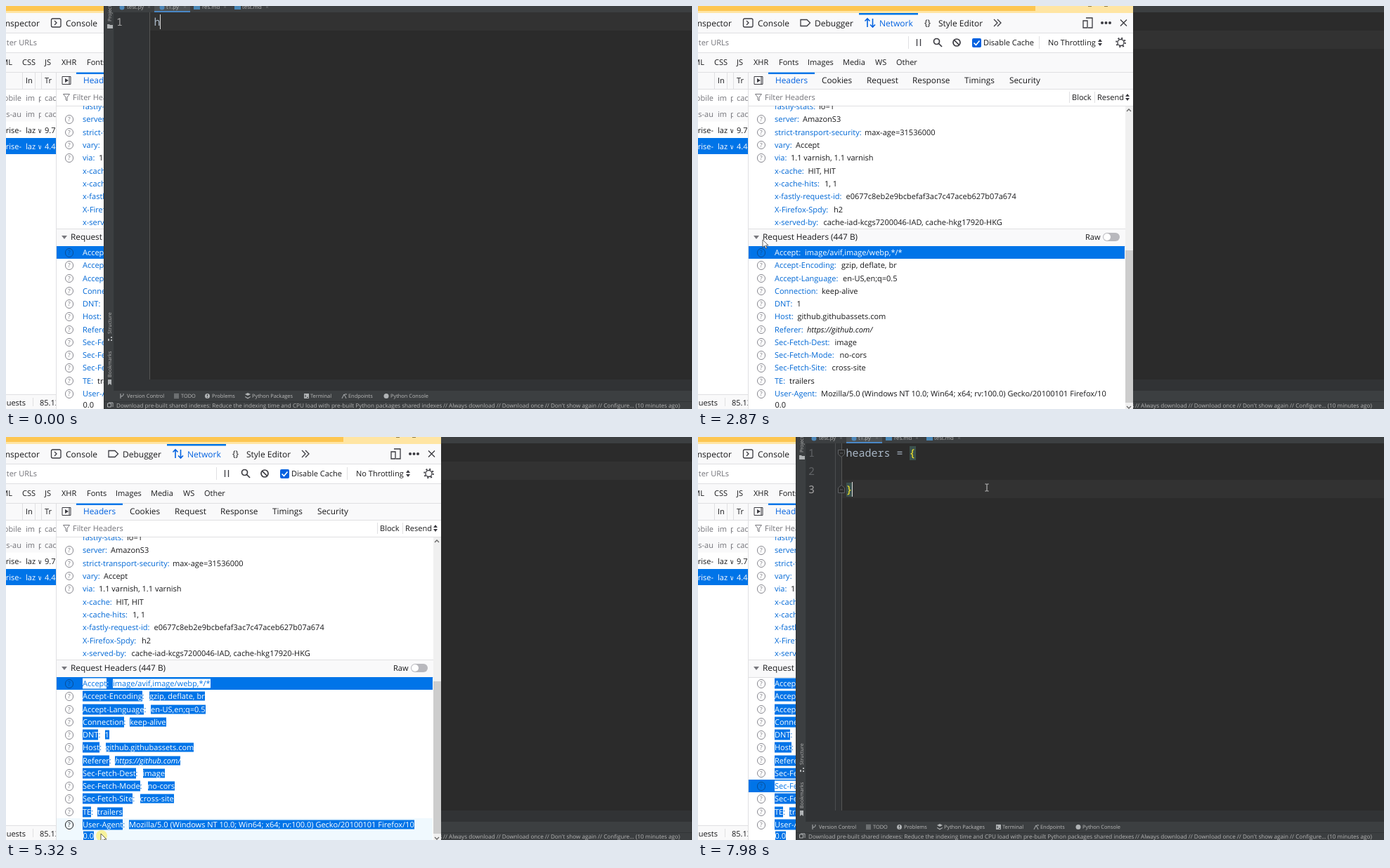
An HTML page that plays this animation: 976 by 574 pixels, repeating every 8000 ms.

```html
<!DOCTYPE html>
<html lang="en">
<head>
<meta charset="utf-8">
<title>Copying request headers</title>
<style>
html, body { margin: 0; width: 100%; height: 100%; overflow: hidden; background: #2b2b2b; }
#stage { position: absolute; left: 0; top: 0; width: 976px; height: 574px; overflow: hidden;
  font: 11px/13px "Open Sans", "Noto Sans", sans-serif; text-rendering: geometricPrecision; }
#stage div, #stage svg, #stage span { position: absolute; }
#stage svg { left: 0; top: 0; overflow: visible; }
#stage .t { white-space: pre; transform: translateY(-50%); }
#stage .t.end { transform: translate(-100%, -50%); }
#stage span.in { position: static; }

#browser { z-index: 1; left: 0; top: 0; width: 619px; height: 574px; background: #fff; color: #18181a; overflow: hidden; }
#browser.front { z-index: 3; }
.bar { font-size: 12px; }
.sub { font-size: 11.8px; }
.dim { color: #737379; }
.blue { color: #0061e0; }
.white { color: #fff; }
#list { inset: 0; clip-path: inset(142px 11px 0 72px); }
.row { left: 72px; width: 535px; }
.row .t { top: 9px; }
.row .label { left: 37px; color: #0068d6; }
.row .help { left: 11.5px; top: 3px; width: 10.6px; height: 10.6px; border: 1px solid #87878f; border-radius: 50%;
  color: #77777f; font-size: 8.5px; line-height: 11px; text-align: center; }
.row .cite { font-style: italic; }
.row.hover { background: #f0f9fe; }
.row.on { background: #0074e8; color: #fff; }
.row.on .label { color: #fff; }
.row.on .help { border-color: #0a4d96; color: #0a4d96; }
.row.hover .help, .row.on.hover .help { border-color: #18181a; color: #18181a; }
.row.on.hover { background: #0074e8; }
.row .sel { background: #0074e8; color: #fff; }
.row.on .sel { background: #fff; color: #0074e8; }
#menu { left: 162px; top: 491px; width: 54px; height: 43px; background: #fff; border: 1px solid #bbb;
  box-shadow: 2px 2px 3px #0006; font-size: 8.3px; color: #111; }
#menu .pick { left: 1px; top: 22px; width: 52px; height: 19px; background: #e3e3e3; }

#ide { z-index: 2; inset: 0; }
.tool { font-size: 7.4px; color: #bbb; }
.note { font-size: 8.15px; color: #b4b4b4; }
.tab { font-size: 7.8px; color: #b4b4b4; }
#ide .side { font-size: 7.1px; line-height: 10px; color: #b4b4b4; white-space: pre; transform-origin: 0 0; transform: rotate(-90deg); }
.code { font: 15px/26px "Noto Sans Mono", "DejaVu Sans Mono", monospace; color: #a9b7c6; white-space: pre; }
.num { color: #606366; left: 157px; }
.num.now { color: #a4a3a3; }
.brace { color: #e8ba36; }
.brace.match { color: #ffef28; background: #3b514d; }
#band { left: 205px; width: 771px; height: 26px; background: #323232; }
#caret { width: 1px; height: 21px; background: #ddd; }
#popup { left: 192px; top: 35px; width: 329px; background: #46484a; border: 1px solid #55585a; }
#popup .first { left: 0; top: 0; width: 329px; height: 21px; background: #515658; }
#popup .code { left: 17px; line-height: 21px; color: #bbb; }
#popup .in { color: #589df6; }
#popup .dot { left: 6px; width: 8px; height: 8px; border-radius: 50%; background: #4d86b8; }
#popup .tip { font-size: 6.2px; color: #85888a; left: 6px; bottom: 2px; white-space: pre; }
#popup .next { left: 122px; color: #589df6; }
#popup .more { left: 322px; bottom: 4px; width: 2px; height: 2px; background: #bbb; box-shadow: 0 -3px #bbb, 0 -6px #bbb; }
#mouse { z-index: 9; }
</style>
</head>
<body>
<div id="stage">
  <div id="browser">
    <svg width="619" height="574" fill="none" stroke="#3a3a40" stroke-width="1.3">
      <g stroke="none">
        <path fill="#ffe5a3" d="M0 0h619v10H0z"/>
        <path fill="#fdc651" d="M0 0h480v7H0z"/>
        <path fill="#f9f9fa" d="M0 10h619v28H0zM0 66h619v52H0zM0 141.5h71v23H0zM72 317h536v25H72zM0 553h71v21H0z"/>
        <path fill="#0074e8" d="M0 188h71v23H0zM229 10h84v2.5h-84zM100 94.5h66v2.5h-66z"/>
        <path fill="#f0f0f0" d="M608 142h11v432h-11z"/>
        <path fill="#cdcdcd" d="M608 348h11v217h-11z"/>
        <rect x="390" y="46" width="13" height="13" rx="2" fill="#0061e0"/>
        <rect x="576" y="323" width="24" height="12" rx="6" fill="#b8b8bd"/>
        <circle cx="582" cy="329" r="5" fill="#fff"/>
        <path fill="#77777d" d="M79 327h8l-4 5z"/>
        <g fill="#3a3a40"><circle cx="575" cy="24" r="2"/><circle cx="580.5" cy="24" r="2"/><circle cx="586" cy="24" r="2"/>
          <path d="M569 51l3-4 3 4zM569 53l3 4 3-4zM608 129l3-4 3 4zM608 131l3 4 3-4zM84 103l5 3-5 3z"/></g>
      </g>
      <path stroke="#e0e0e2" stroke-width="1" d="M0 38.5h619M0 66.5h619M0 94.5h100M166 94.5h453M0 118.5h619M72 142.5h547M72 317.5h536M72 342.5h536M0 553.5h71M71.5 94v480M23.5 95v23M41.5 95v23M50.5 95v23M38.5 558v12M299.5 43v18M485.5 43v18M528.5 122v16M564.5 122v16"/>
      <rect x="64.5" y="18" width="13.5" height="12" rx="2"/><path d="M69 21l3 3-3 3"/>
      <path d="M146 19.500h9l4.500 4.500-4.500 4.500h-9zM421 19l5 5-5 5M426 19l5 5-5 5M601 19.500l9 9M610 19.500l-9 9M311.500 47v10M316.500 47v10"/>
      <path stroke="#0061e0" stroke-width="1.600" d="M241 30V18M237.500 21.500l3.500-3.500 3.500 3.500M248.500 18v12M245 26.500l3.500 3.500 3.500-3.500"/>
      <path d="M552 17h9v14h-6M548 21h6v10h-6z"/>
      <g stroke-width="1.700"><circle cx="339.500" cy="50.500" r="4"/><path d="M342.500 53.500l4.500 4.500"/><circle cx="368" cy="52" r="5"/><path d="M364.500 48.500l7 7"/></g>
      <circle cx="601.500" cy="52" r="4.500"/><circle cx="601.500" cy="52" r="6.300" stroke-width="2" stroke-dasharray="2 2.950"/>
      <path stroke="#fff" stroke-width="1.600" d="M392.500 52.500l3 3 5-6"/>
      <path stroke-width="1" d="M80 100.500h12v11H80zM90 100.500v11"/>
      <path stroke="#77777d" stroke-width="1" d="M81.500 125.500h9l-3.500 4.500v5l-2-1.500v-3.500z"/>
      <path stroke="#666" d="M610 150l3-3 3 3M610 570l3 3 3-3"/>
      <path stroke="#77591c" d="M555 0h5M578 0h5"/>
    </svg>
    <div id="list"></div>
    <div id="menu"><div class="pick"></div>
      <div class="t" style="left:6px;top:13px"><u>C</u>opy</div><div class="t" style="left:6px;top:31px">Copy <u>A</u>ll</div></div>
  </div>

  <div id="ide">
    <svg width="976" height="574" fill="none" stroke="#b0b3b5">
      <g stroke="none">
        <path fill="#3c3f41" d="M139 0h837v574H139z"/>
        <path fill="#2b2b2b" d="M205 9h771v523H205z"/>
        <path fill="#313335" d="M153 9h51v539h-51zM204 532h772v16H204z"/>
        <path fill="#4e5254" d="M211 0h51v7h-51z"/><path fill="#4a88c7" d="M211 7h51v2h-51z"/>
        <circle cx="165" cy="2" r="3.5" fill="#4d86b8"/><circle cx="222" cy="2" r="3.5" fill="#4d86b8"/>
        <path fill="#4a88b7" d="M267 0h9v5h-9zM325 0h9v5h-9z"/>
        <path fill="#b0b3b5" d="M144 26h3l1 1h4v5h-8zM145 474h2v3h-2zM149 471h2v2h-2zM149 475h2v2h-2zM145 532h5v8l-2.500-2-2.500 2zM424 552h7v7h-7zM340 553l4-2 4 2-4 2zM340 556l4 2 4-2v1l-4 2.500-4-2.500z"/>
        <circle cx="286.500" cy="555.500" r="3.500" fill="#b0b3b5"/><circle cx="541" cy="555.500" r="3.500" fill="#b0b3b5"/>
      </g>
      <path stroke="#323537" d="M153.500 9v539M139 563.500h837M139.500 0v574"/>
      <path stroke="#555" d="M204.500 9v523"/>
      <path id="guide" stroke="#4b4d4f" d="M195.500 9v523"/>
      <path d="M163 552v7M167 552v2q0 2-4 2M239 553h7M239 555.500h7M239 558h7M478 559l3-6 3 6M482 553h3M144.500 566h5v5h-5zM146 565h6v6"/>
      <path stroke="#3c3f41" d="M286.500 553v3M286.500 557v1M425 554l2 1.500-2 1.500M428 557.500h2"/>
      <path stroke="#707375" stroke-width=".8" d="M202 0l3 3M205 0l-3 3M253 0l3 3M256 0l-3 3M310 0l3 3M313 0l-3 3M370 0l3 3M373 0l-3 3"/>
    </svg>
    <div id="band"></div>
    <svg id="folds" width="300" height="100" fill="#2b2b2b" stroke="#606366">
      <path d="M199.500 18.500h9v6l-4.500 4-4.500-4zM199.500 79.500h9v-7l-4.500-4-4.500 4zM202 23h4M202 75h4"/>
      <path fill="none" stroke="#a9923f" d="M211 83l2-2 2 2 2-2 2 2"/>
    </svg>
    <div id="lines"></div>
    <div id="caret"></div>
    <div id="popup"></div>
  </div>

  <svg id="mouse" width="20" height="20">
    <circle id="press" cx="1" cy="3" r="8" fill="#ffef4a" opacity=".55"/>
    <path id="arrow" d="M0 0v11l2.600-2.400 1.800 4 1.800-.8-1.800-3.800h3.600z" fill="#fff" stroke="#222" stroke-width=".7"/>
    <path id="beam" d="M-2.500-5h2l.5.500.5-.500h2M0-4.500v9M-2.500 5h2l.5-.500.5.500h2" fill="none" stroke="#ccc"/>
  </svg>
</div>
<script>
const $ = id => document.getElementById(id);
const browser = $('browser'), ide = $('ide'), list = $('list'), popup = $('popup');

function make(parent, cls, style = {}, html = '') {
  const el = document.createElement('div');
  el.className = cls;
  el.innerHTML = html;
  for (const key in style) el.style[key] = typeof style[key] === 'number' ? style[key] + 'px' : style[key];
  parent.append(el);
  return el;
}
// Each item: x, vertical centre, text, optional clip width.
function texts(parent, cls, items) {
  for (const [left, top, text, width] of items)
    make(parent, 't ' + cls, width ? { left, top, width, overflow: 'hidden' } : { left, top }, text);
}

texts(browser, 'bar end', [[48, 24, 'Inspector']]);
texts(browser, 'bar', [[85, 24, 'Console'], [166, 24, 'Debugger'], [322, 23, '{}'], [342, 24, 'Style Editor']]);
texts(browser, 'bar blue', [[258, 24, 'Network']]);
texts(browser, 'dim end', [[44, 52, 'Filter URLs']]);
texts(browser, 'end', [[9, 80, 'HTML'], [28, 565, 'requests']]);
texts(browser, '', [[406, 52, 'Disable Cache'], [498, 52, 'No Throttling'], [23, 80, 'CSS'], [55, 80, 'JS'], [79, 80, 'XHR'],
  [115, 80, 'Fonts'], [156, 80, 'Images'], [206, 80, 'Media'], [252, 80, 'WS'], [282, 80, 'Other'],
  [28, 106, 'In'], [55, 106, 'Tr'], [532, 130, 'Block'], [568, 130, 'Resend'], [48, 565, '85.13', 23]]);
texts(browser, 'sub blue', [[110, 106, 'Headers']]);
texts(browser, 'sub', [[176, 106, 'Cookies'], [240, 106, 'Request'], [305, 106, 'Response'], [379, 106, 'Timings'],
  [443, 106, 'Security'], [92, 329, 'Request Headers (447 B)']]);
texts(browser, '', [[551, 329, 'Raw']]);
texts(browser, 'dim', [[95, 130, 'Filter Headers']]);
[['mobile', 'im', 'p', 'cac'], ['ns-au', 'im', 'p', 'cac'], ['prise-', 'laz', 'w', '9.7'], ['prise-', 'laz', 'w', '4.4']]
  .forEach(([file, by, type, size], i) => {
    const y = 130.5 + 23 * i, cls = ['dim', 'dim', '', 'white'][i];
    texts(browser, cls + ' end', [[22, y, file]]);
    texts(browser, cls, [[28, y, by, 14], [46, y, type, 4], [55, y, size, 16]]);
  });

function headerRow(y, name, x, value, help, height = 18.3) {
  const row = make(list, 'row', { top: y - 9, height });
  if (help) make(row, 'help', {}, '?');
  make(row, 't label', {}, `<span class="in">${name}</span>:`);
  const cells = [row.querySelector('.in'), make(row, 't', { left: x - 72 }, value)];
  return { row, cells };
}
[['fastly-stats', 172, 'io=1'], ['server', 149, 'AmazonS3'], ['strict-transport-security', 237, 'max-age=31536000'],
  ['vary', 139, 'Accept'], ['via', 132, '1.1 varnish, 1.1 varnish'], ['x-cache', 156.5, 'HIT, HIT'], ['x-cache-hits', 180, '1, 1'],
  ['x-fastly-request-id', 210.5, 'e0677c8eb2e9bcbefaf3ac7c47aceb627b07a674'], ['X-Firefox-Spdy', 193, 'h2'],
  ['x-served-by', 178.5, 'cache-iad-kcgs7200046-IAD, cache-hkg17920-HKG']]
  .forEach(([name, x, value], i) => headerRow(142.8 + 18.35 * i, name, x, value, i > 0 && i < 5));

const PITCH = 18.27;
const rows = [['Accept', 152, 'image/avif,image/webp,*/*'], ['Accept-Encoding', 204, 'gzip, deflate, br'],
  ['Accept-Language', 206, 'en-US,en;q=0.5'], ['Connection', 176, 'keep-alive'], ['DNT', 140.5, '1'],
  ['Host', 141.5, 'github.githubassets.com'], ['Referer', 155, 'https://github.com/'], ['Sec-Fetch-Dest', 194.5, 'image'],
  ['Sec-Fetch-Mode', 201.5, 'no-cors'], ['Sec-Fetch-Site', 190.5, 'cross-site'], ['TE', 130, 'trailers'],
  ['User-Agent', 175, 'Mozilla/5.0 (Windows NT 10.0; Win64; x64; rv:100.0) Gecko/20100101 Firefox/10']]
  .map(([name, x, value], i) => headerRow(351 + PITCH * i, name, x, value, true, i < 11 ? 18.3 : 32));
rows[6].cells[1].classList.add('cite');
const agent = rows[11];
agent.cells.push(make(agent.row, 't', { left: 37.5, top: 25 }, '0.0'));
agent.cells[2].style.top = '25px';

texts(ide, 'tool', [[172, 555.5, 'Version Control'], [249, 555.5, 'TODO'], [293, 555.5, 'Problems'], [350, 555.5, 'Python Packages'],
  [433, 555.5, 'Terminal'], [487, 555.5, 'Endpoints'], [547, 555.5, 'Python Console']]);
texts(ide, 'note', [
  [157, 568.5, 'Download pre-built shared indexes: Reduce the indexing time and CPU load with pre-built Python packages shared indexes'],
  [622, 568.5, "// Always download // Download once // Don't show again // Configure... (10 minutes ago)"]]);
texts(ide, 'tab', [[172, 1.5, 'test.py'], [228, 1.5, 't1.py'], [279, 1.5, 'res.md'], [336, 1.5, 'test.md']]);
[[22, 'Project'], [467, 'Structure'], [529, 'Bookmarks']].forEach(([top, text]) => make(ide, 'side', { left: 143, top }, text));

const nums = [], lines = [];
for (let i = 0; i < 3; i++) {
  nums.push(make($('lines'), 'code num', { top: 9.5 + 26 * i }, i + 1));
  lines.push(make($('lines'), 'code', { left: 210.5, top: 9.5 + 26 * i }));
}

const SOURCE = 'headers = {';
const KEYS = [0, 350, 490, 700, 840, 910, 1050, 1190, 1260, 1400, 1470];
const ENTER = 1610, BROWSER_UP = 2660, DRAG = 3500, DROP = 5400, RIGHT_CLICK = 5880, MENU = 5950, COPY = 6650, IDE_UP = 7490, LINE3 = 7630;
const HINTS = [[], ['help', 'hex', 'hash', 'hasattr', 'heapq', 'hmac', 'html', 'http', 'hashlib', 'html.parser', 'http.client', 'http.server'],
  ['help', 'hex', 'heapq'], ['heapq']];
const PATH = [[1750, 362, 30], [2100, 209, 126], [2520, 86, 324], [2660, 86, 326], [3360, 106, 349], [3500, 109, 350], [3710, 146, 365],
  [4200, 146, 465], [5040, 136, 564], [5320, 135, 565], [5400, 135, 565], [5880, 160, 491], [6160, 160, 491], [6440, 185, 523],
  [6650, 185, 523], [7490, 674, 120], [7630, 660, 118], [7910, 411, 72], [8000, 411, 72]];

function mouseAt(t) {
  const i = Math.max(1, PATH.findIndex(p => p[0] > t));
  const [t0, x0, y0] = PATH[i - 1], [t1, x1, y1] = PATH[i];
  const k = Math.max(0, (t - t0) / (t1 - t0));
  return [x0 + (x1 - x0) * k, y0 + (y1 - y0) * k];
}
const show = (el, on) => { el.style.visibility = on ? 'visible' : 'hidden'; };
const setHtml = (el, html) => { if (el.shown !== html) el.innerHTML = el.shown = html; };
const brace = (char, match) => `<span class="in brace${match ? ' match' : ''}">${char}</span>`;

function paintEditor(t, ideFront) {
  const count = KEYS.filter(k => k <= t).length, open = count === SOURCE.length, split = t >= ENTER;
  const line = t >= LINE3 ? 3 : split ? 2 : 1;
  const match = open && line !== 2;
  setHtml(lines[0], open ? 'headers = ' + brace('{', match) + (split ? '' : brace('}', match)) : SOURCE.slice(0, count));
  setHtml(lines[2], split ? brace('}', match) : '');
  nums.forEach((el, i) => { show(el, !i || split); el.classList.toggle('now', i + 1 === line); });
  show($('folds'), split);
  show($('guide'), t >= IDE_UP);
  $('band').style.top = 9 + 26 * (line - 1) + 'px';
  const column = [count, 4, 1][line - 1], blinkFrom = line === 3 ? LINE3 : ENTER + 70;
  $('caret').style.left = 210 + 9 * column + 'px';
  $('caret').style.top = 12 + 26 * (line - 1) + 'px';
  show($('caret'), ideFront && (t < blinkFrom || (t - blinkFrom) % 1000 < 500));

  const hints = t >= 70 && HINTS[count] || [];
  show(popup, hints.length);
  popup.style.height = hints.length * 21.4 + 16 + 'px';
  setHtml(popup, hints.length ? '<div class="first"></div>' + hints.map((word, i) =>
    `<div class="dot" style="top:${i * 21.4 + 7}px"></div><div class="code" style="top:${i * 21.4}px"><span class="in">${word.slice(0, count)}</span>${word.slice(count)}</div>`).join('') +
    '<div class="tip">Press Enter to insert, Tab to replace</div><div class="tip next">Next Tip</div><div class="more"></div>' : '');
}

function paintHeaders(t, x, y, ideFront) {
  const rowAt = Math.min(11, Math.floor((y - 342) / PITCH));
  const current = t < DRAG ? -1 : t < DROP ? rowAt : 99;
  const hover = ideFront || t < 3360 || t >= MENU && t < COPY || x > 607 ? -1 : t < 4760 ? 0 : rowAt;
  const active = t < RIGHT_CLICK ? 0 : 8;
  rows.forEach(({ row, cells }, i) => {
    row.classList.toggle('on', i === active);
    row.classList.toggle('hover', i === hover);
    const full = i < current || i === current && y >= 560;
    cells.forEach((cell, part) => cell.classList.toggle('sel', full || i === current && part === 0));
  });
  show($('menu'), t >= MENU && t < COPY);
  show($('menu').firstChild, t >= 6370 && t < COPY);
}

function paint(t) {
  const ideFront = t < BROWSER_UP || t >= IDE_UP;
  const [x, y] = mouseAt(t);
  browser.classList.toggle('front', !ideFront);
  paintEditor(t, ideFront);
  paintHeaders(t, x, y, ideFront);
  const inEditor = x > (ideFront ? 215 : 619), seen = t >= PATH[0][0];
  $('mouse').style.transform = `translate(${x}px, ${y}px)`;
  show($('arrow'), seen && !inEditor);
  show($('beam'), seen && inEditor);
  show($('press'), t >= DRAG && t < DROP);
}

const start = performance.now();
function tick() {
  const t = (performance.now() - start) % 8000;
  paint(Math.floor(t / 70) * 70);
  requestAnimationFrame(tick);
}
tick();
</script>
</body>
</html>
```
